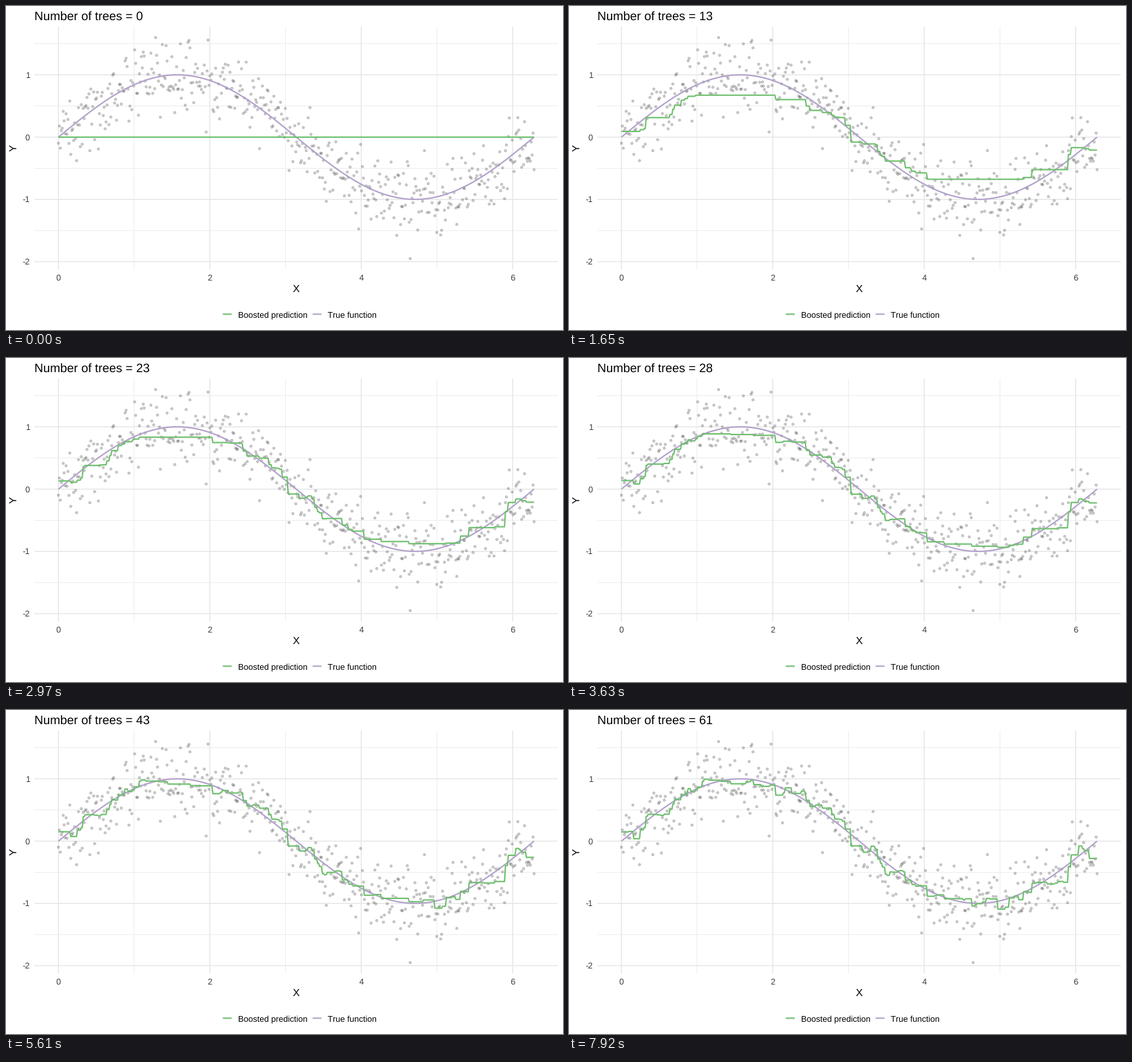
A matplotlib script that plays this animation: 864x504 px, repeating every 8 s.

```python
import math

import matplotlib.pyplot as plt
import numpy as np
from matplotlib.animation import FuncAnimation

W, H = 864, 504
INTERVAL, FRAMES = 40, 200
STEP_MS = 330                    # time each boosting stage stays on screen
TREES_PER_STEP = 250 / 99
LAST_STEP = (FRAMES * INTERVAL - 1) // STEP_MS

GREEN, PURPLE = "#6dbf6d", "#b2a0cb"
GRID, TICK_TEXT = "#e7e7e7", "#3b3b3b"
LEFT, RIGHT, TOP, BOTTOM = 44.4, 856.0, 31.9, 410.1

plt.rcParams.update({
    "font.family": "Liberation Sans",
    "text.hinting": "none",
    "text.hinting_factor": 1,
    "path.simplify": False,
})


def normal_noise(seed, n):
    """Mersenne Twister normals by inversion, seeded through a simple LCG."""
    keys = []
    for i in range(675):
        seed = (69069 * seed + 1) % 2**32
        if i > 50:
            keys.append(seed)
    gen = np.random.MT19937()
    gen.state = {"bit_generator": "MT19937",
                 "state": {"key": np.array(keys, dtype=np.uint32), "pos": 624}}
    u = gen.random_raw(2 * n) / 2**32
    p = (np.floor(u[::2] * 2**27) + u[1::2]) / 2**27
    z = np.linspace(-5, 5, 10001)
    cdf = [0.5 * math.erfc(-v / math.sqrt(2)) for v in z]
    return np.interp(p, cdf, z)


def fit_tree(r, depth=3, min_split=20, min_leaf=7):
    """Regression tree on sorted inputs; returns the fitted values."""
    n = len(r)
    if depth == 0 or n < min_split:
        return np.full(n, r.mean())
    k = np.arange(min_leaf, n - min_leaf + 1)
    left = np.cumsum(r - r.mean())[k - 1]
    cut = k[np.argmax(left**2 / (k * (n - k)))]
    return np.concatenate([fit_tree(r[:cut], depth - 1),
                           fit_tree(r[cut:], depth - 1)])


def boost(y, trees, rate=0.1):
    fits = [np.zeros_like(y)]
    for _ in range(trees):
        fits.append(fits[-1] + rate * fit_tree(y - fits[-1]))
    return fits


def trees_at(step):
    return round(step * TREES_PER_STEP)


x = np.linspace(0, 2 * np.pi, 500)
truth = np.sin(x)
y = truth + 0.3 * normal_noise(101, len(x))
fits = boost(y, trees_at(LAST_STEP))

fig = plt.figure(figsize=(W / 72, H / 72), dpi=72, facecolor="white")
ax = fig.add_axes([LEFT / W, 1 - BOTTOM / H,
                   (RIGHT - LEFT) / W, (BOTTOM - TOP) / H])
ax.axis("off")


def padded(v):
    pad = 0.05 * (v.max() - v.min())
    return v.min() - pad, v.max() + pad


ax.set_xlim(*padded(x))
ax.set_ylim(*padded(y))


def label(px, py, text, size, color="black", **kw):
    return fig.text(px / W, 1 - py / H, text, fontsize=size, color=color,
                    va=kw.pop("va", "baseline"), **kw)


def to_px(vx, vy):
    px, py = ax.transData.transform((vx, vy))
    return px, H - py


def grid(xs, ys, width):
    for v in ys:
        ax.axhline(v, color=GRID, lw=width, snap=False, zorder=1)
    for v in xs:
        ax.axvline(v, color=GRID, lw=width, snap=False, zorder=1)


grid((1, 3, 5), (-1.5, -0.5, 0.5, 1.5), 0.78)
grid((0, 2, 4, 6), (-2, -1, 0, 1), 1.55)

ink = (0, 0, 0, 0.2)
ax.scatter(x, y, s=np.full(len(x), 3.9**2), facecolor=[ink],
           edgecolor=[ink], linewidth=0.71, zorder=2)

stroke = dict(lw=2.13, solid_capstyle="butt", solid_joinstyle="round")
ax.plot(x, truth, color=PURPLE, zorder=3, **stroke)
fit_line, = ax.plot(x, fits[0], color=GREEN, zorder=4, **stroke)

for v in (0, 2, 4, 6):
    label(to_px(v, 0)[0], 427, str(v), 12.8, TICK_TEXT, ha="center")
for v in (-2, -1, 0, 1):
    label(37.2, to_px(0, v)[1] + 4.6, str(v), 12.8, TICK_TEXT, ha="right")

middle = (LEFT + RIGHT) / 2
label(middle, 445, "X", 16, ha="center")
label(20, (TOP + BOTTOM) / 2, "Y", 16, rotation=90, ha="right", va="center")

for px, name, color in ((334.6, "Boosted prediction", GREEN),
                        (473.9, "True function", PURPLE)):
    fig.add_artist(plt.Line2D([(px + 1.7) / W, (px + 15.5) / W],
                              [1 - 479.4 / H] * 2, color=color, snap=False,
                              **stroke))
    label(px + 25.2, 485, name, 12.8)

title = label(44, 22, "", 19.2)


def update(i):
    step = (i * INTERVAL + INTERVAL - 1) // STEP_MS
    trees = trees_at(step)
    fit_line.set_ydata(fits[trees])
    title.set_text(f"Number of trees = {trees}")
    return fit_line, title


anim = FuncAnimation(fig, update, frames=FRAMES, interval=INTERVAL,
                     repeat=True, repeat_delay=0, blit=False)
plt.show()
```
